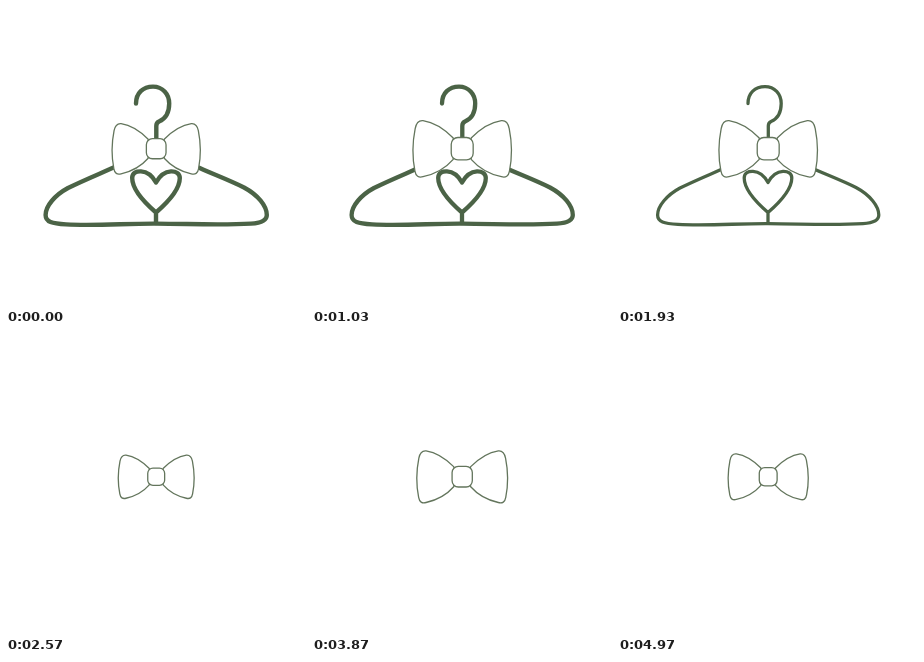
Write an HTML page with a canvas that moves like this. It is 300 px wide and 300 px high and loops after 5.01 s.

```html
<!DOCTYPE html>
<html lang="en">
<head>
<meta charset="utf-8">
<title>Hanger with bow</title>
<style>
  html, body { margin: 0; width: 100%; height: 100%; overflow: hidden; background: #fff; }
  canvas { display: block; width: 300px; height: 300px; }
</style>
</head>
<body>
<canvas id="stage" width="300" height="300"></canvas>
<script>
const ctx = document.getElementById('stage').getContext('2d');
const LOOP = 5010, STEP = 100 / 3, LAST = 149;
const BLINK = 100 / 3;   // hanger period, in steps
const PULSE = 27;        // bow period, in steps
const GREEN = '#4b6346', OUTLINE = '#63755c';

const hanger = [
  // hook
  'M130 97.5 C130 87 137 80.6 147 80.6 C156.5 80.6 163.2 88 163.2 97.5 C163.2 107 159 113 153 115.5 Q150.3 116.8 150.3 120 V136',
  // shoulders and bar
  'M112 159.5 C98 166 78 174 62 182 C49 189 39.6 200 39.6 209 C39.6 216 46 217.6 60 218.4 C90 220 120 217.4 150 217.6 C185 217.8 215 219.4 245 217.6 C256 217 260.8 214.5 260.8 209 C260.8 200 252 189 238 181.5 C222 173.5 204 167 188 159.5',
  // heart and stem
  'M150 217 V206.5 C139 197 126.2 183 126.2 172 C126.2 166.5 130.5 165.2 135 165.4 C142 165.8 147 171 150 176.5 C153 171 158 165.8 165 165.4 C170 165.2 173.8 167.5 173.8 172 C173.8 183 161 197 150 206.5'
].map(d => new Path2D(d));

// bow around its own centre, half width 44
const wing = new Path2D('M-8 -9.5 C-16 -17.5 -25 -23.5 -35 -25 C-39 -25.4 -41 -23 -42 -18 C-44.4 -6 -44.4 9 -42.2 20 C-41.4 24.6 -39 26 -35 25 C-24 22.6 -15 17.5 -8 9.5 Z');
const knot = new Path2D();
knot.roundRect(-9.8, -10, 19.6, 20, 6);

const ease = x => (1 - Math.cos(Math.PI * x)) / 2;

function bowHalf(n) {
  const peak = 4.3, fall = 17.7, rise = PULSE - fall, big = 49.3, small = 37.6;
  const p = (n - peak + PULSE) % PULSE;
  const k = p < fall ? 1 - ease(Math.pow(p / fall, 0.6)) : ease((p - fall) / rise);
  return small + (big - small) * k;
}

function drawHanger(n) {
  const p = n % BLINK;
  if (Math.min(p, BLINK - p) > 9.5) return;
  const level = (1 + Math.cos(2 * Math.PI * p / BLINK)) / 2;
  ctx.strokeStyle = GREEN;
  ctx.lineWidth = 4.4 - 2.1 * (1 - level);
  hanger.forEach(path => ctx.stroke(path));
}

function drawShape(path) {
  ctx.fill(path);
  ctx.stroke(path);
}

function drawBow(n) {
  const s = bowHalf(n) / 44;
  ctx.save();
  ctx.translate(150.2, 142.7);
  ctx.scale(s, s);
  ctx.fillStyle = '#fff';
  ctx.strokeStyle = OUTLINE;
  ctx.lineWidth = 1.3 / s;
  drawShape(wing);
  ctx.scale(-1, 1);
  drawShape(wing);
  drawShape(knot);
  ctx.restore();
}

function draw(t) {
  const n = Math.min(LAST, Math.floor((t % LOOP + 4) / STEP));
  ctx.fillStyle = '#fff';
  ctx.fillRect(0, 0, 300, 300);
  ctx.lineCap = ctx.lineJoin = 'round';
  drawHanger(n);
  drawBow(n);
}

const start = performance.now();
function tick() {
  draw(performance.now() - start);
  requestAnimationFrame(tick);
}
tick();
</script>
</body>
</html>
```
